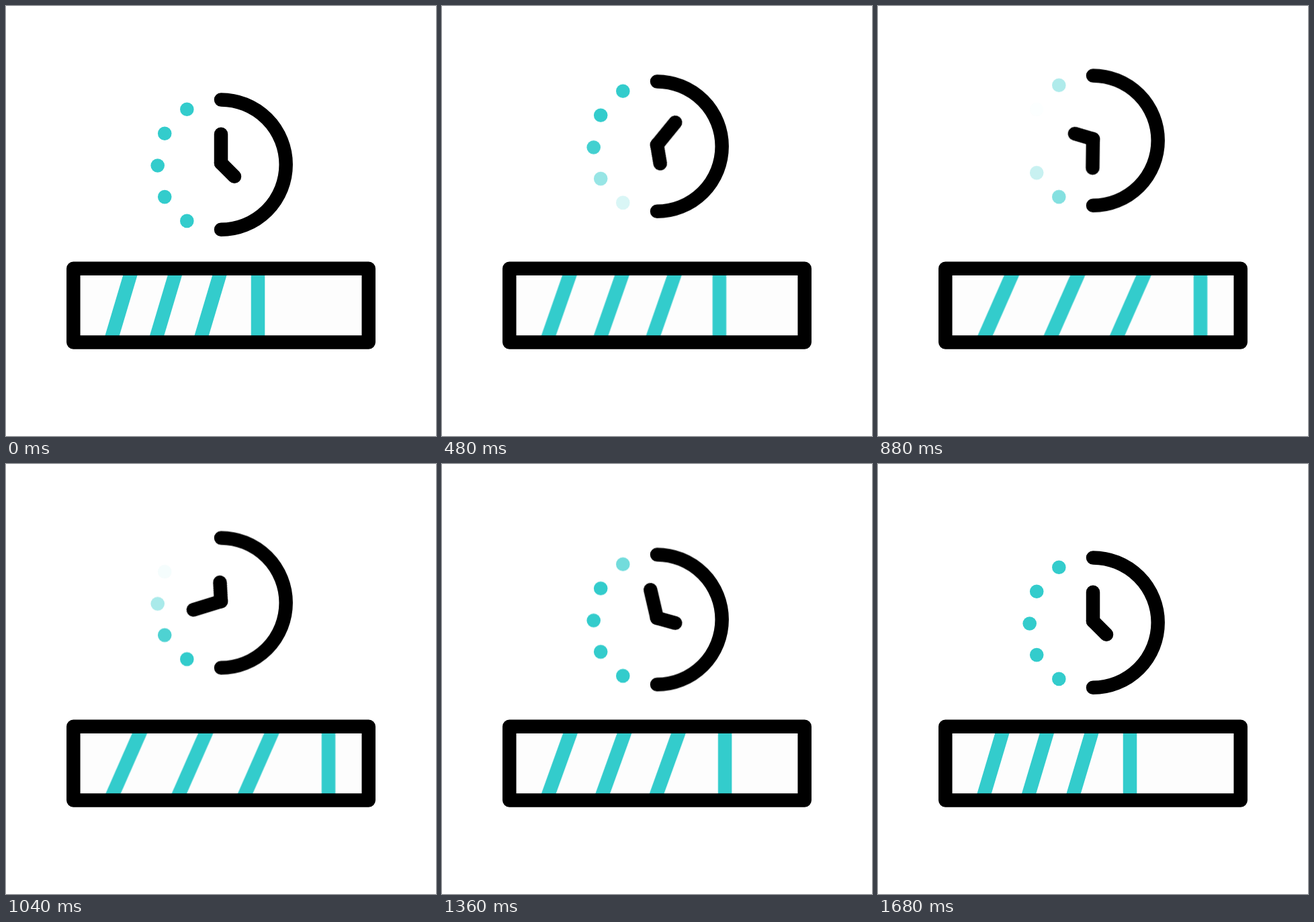
Animation of 640 by 640 pixels, one loop 1.72 s. Source, as an HTML page:

```html
<!DOCTYPE html>
<html lang="en">
<head>
<meta charset="utf-8">
<title>Loading</title>
<style>
  html, body { margin: 0; width: 100%; height: 100%; overflow: hidden; background: #fff; }
  svg { display: block; width: 100%; height: 100%; }
  .ink, .stripes { fill: none; stroke-width: 20.5; stroke-linecap: round; stroke-linejoin: round; }
  .ink { stroke: #000; }
  .stripes { stroke: #3cc; stroke-linecap: butt; }
  .stripes path { vector-effect: non-scaling-stroke; }

  .clock, .long, .short, .stripes, .dots circle { animation: 1720ms linear infinite; }
  .clock { animation-name: bob; }
  .long, .short { transform-origin: 320px 233.8px; }
  .long { animation-name: long; }
  .short { animation-name: short; }
  .stripes { transform-origin: 155.2px 0; animation-name: stretch; }
  .dots { fill: #3cc; }
  .dots circle { animation-name: blink; animation-delay: var(--d); }

  /* Motion ends at 1680 ms, then rests until the loop restarts. */
  @keyframes bob {
    0% { transform: translateY(0); animation-timing-function: cubic-bezier(.61, 0, .3, 1); }
    48.837% { transform: translateY(-36px); animation-timing-function: cubic-bezier(.41, 0, .26, 1); }
    97.674%, 100% { transform: translateY(0); }
  }
  @keyframes long {
    0% { transform: rotate(0deg); animation-timing-function: cubic-bezier(.333, 0, .667, .249); }
    18.605% { transform: rotate(14.2deg); animation-timing-function: cubic-bezier(.333, .215, .667, .538); }
    27.907% { transform: rotate(39deg); animation-timing-function: cubic-bezier(.333, .249, .667, .571); }
    41.86% { transform: rotate(108deg); animation-timing-function: cubic-bezier(.333, .273, .667, .727); }
    60.465% { transform: rotate(252.5deg); animation-timing-function: cubic-bezier(.333, .419, .667, .876); }
    79.07% { transform: rotate(346.8deg); animation-timing-function: cubic-bezier(.333, .889, .667, 1); }
    97.674%, 100% { transform: rotate(360deg); }
  }
  @keyframes short {
    0% { transform: rotate(0deg); animation-timing-function: cubic-bezier(.6, 0, .57, 1); }
    97.674%, 100% { transform: rotate(360deg); }
  }
  @keyframes stretch {
    0% { transform: scaleX(1); animation-timing-function: cubic-bezier(.62, 0, .58, 1); }
    55.814% { transform: scaleX(1.4845); animation-timing-function: cubic-bezier(.58, 0, .49, 1); }
    97.674%, 100% { transform: scaleX(1); }
  }
  @keyframes blink {
    0% { opacity: 1; animation-timing-function: cubic-bezier(.333, 0, .667, 1); }
    21.5% { opacity: 0; }
    26.6% { opacity: 0; animation-timing-function: cubic-bezier(.333, 0, .667, 1); }
    48.1%, 100% { opacity: 1; }
  }
</style>
</head>
<body>
<svg viewBox="0 0 640 640">
  <rect x="100.3" y="390.8" width="439.4" height="109.6" fill="#fdfdfd"/>
  <g class="stripes">
    <path d="M155.2 500.4L187.8 390.8"/>
    <path d="M221.7 500.4L254.3 390.8"/>
    <path d="M288.2 500.4L320.8 390.8"/>
    <path d="M375 500.4V390.8"/>
  </g>
  <rect class="ink" x="100.3" y="390.8" width="439.4" height="109.6"/>
  <g class="clock">
    <g class="dots">
      <circle cx="269.3" cy="153.8" r="10.3" style="--d: 670ms"/>
      <circle cx="236.2" cy="189.7" r="10.3" style="--d: 535ms"/>
      <circle cx="225.7" cy="237.5" r="10.3" style="--d: 418ms"/>
      <circle cx="236.2" cy="284.1" r="10.3" style="--d: 298ms"/>
      <circle cx="269.3" cy="319.9" r="10.3" style="--d: 213ms"/>
    </g>
    <g class="ink">
      <path d="M320 139.4A96.7 96.7 0 0 1 320 332.8"/>
      <path class="long" d="M320 233.8V190.8"/>
      <path class="short" d="M320 233.8L340 253.7"/>
    </g>
  </g>
</svg>
</body>
</html>
```
